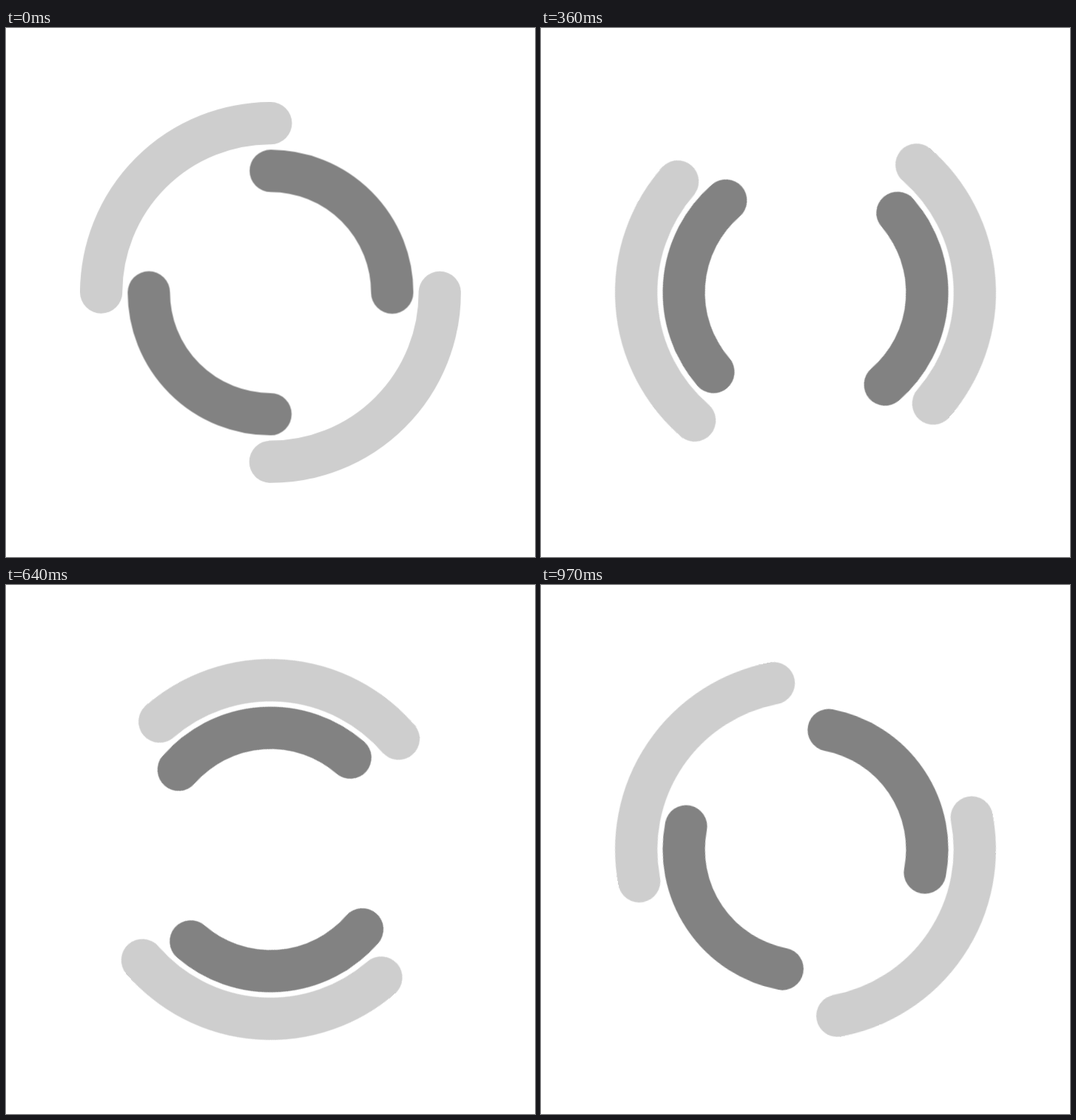
An HTML page for the animation above (1000 ms loop, 715 by 715 pixels).

```html
<!DOCTYPE html>
<html lang="en">
<head>
<meta charset="utf-8">
<title>Loading</title>
<style>
  html, body { margin: 0; width: 100%; height: 100%; overflow: hidden; background: #fff; }
  svg { display: block; width: 100vw; height: 100vh; }
  circle {
    --step: calc(360deg / 33);
    fill: none;
    stroke-width: 8;
    stroke-linecap: round;
    transform-origin: 50px 50px;
    /* the 1 ms lead keeps samples clear of the step edges */
    animation: spin 1s -1ms infinite;
  }
  .outer { --dir: 1; stroke: #cecece; }
  .inner { --dir: -1; stroke: #828282; }

  /* 33 equal turns of 30 ms each; the one at 480 ms holds for 40 ms */
  @keyframes spin {
    0%   { transform: rotate(0deg); animation-timing-function: steps(16, end); }
    48%  { transform: rotate(calc(var(--dir) * 16 * var(--step))); animation-timing-function: steps(1, end); }
    52%  { transform: rotate(calc(var(--dir) * 17 * var(--step))); animation-timing-function: steps(16, end); }
    100% { transform: rotate(calc(var(--dir) * 33 * var(--step))); }
  }
</style>
</head>
<body>
<svg viewBox="0 0 100 100">
  <circle class="outer" cx="50" cy="50" r="32" stroke-dasharray="50.26548"/>
  <circle class="inner" cx="50" cy="50" r="23" stroke-dasharray="36.12832" stroke-dashoffset="36.12832"/>
</svg>
</body>
</html>
```
